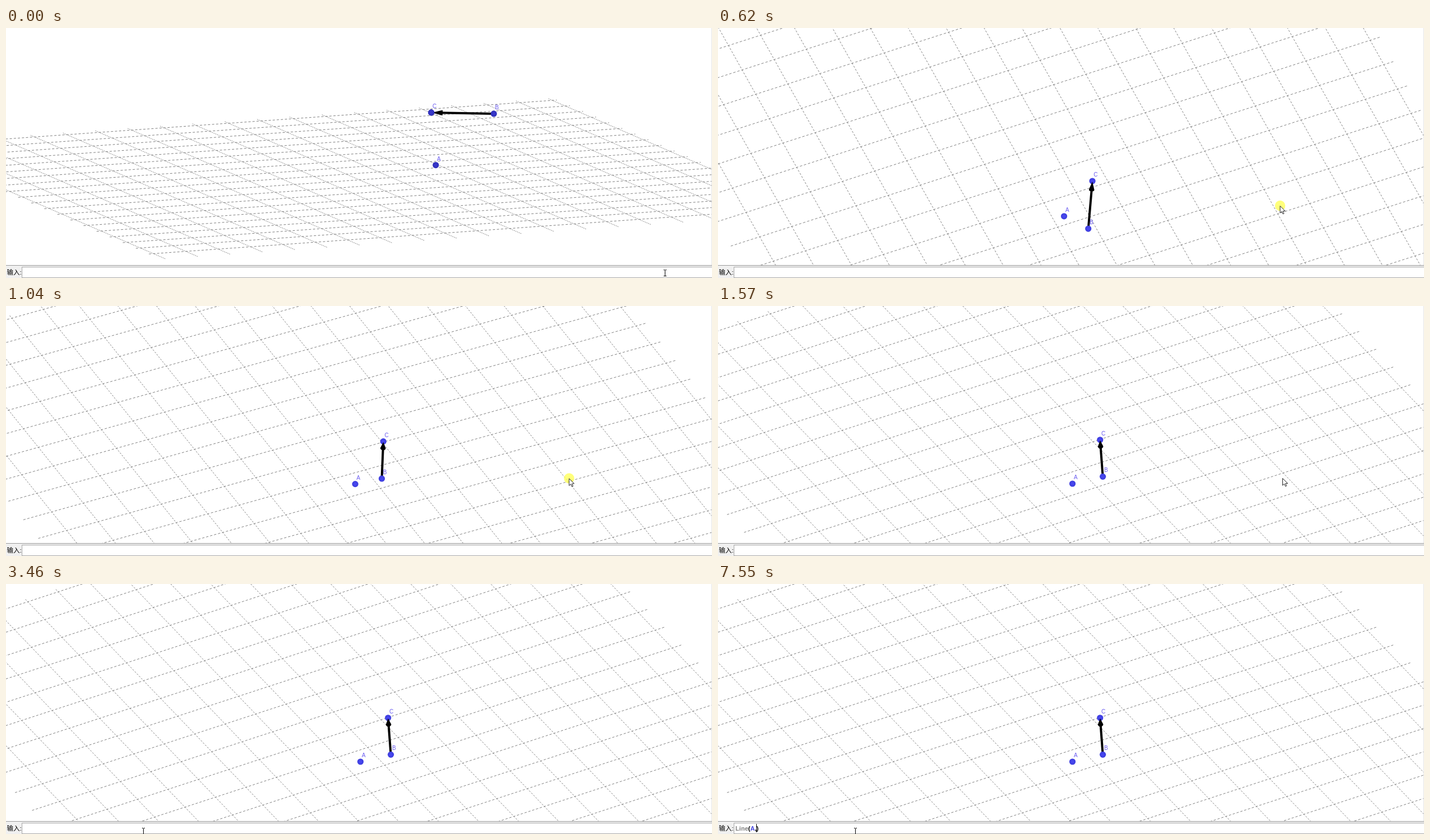
An HTML page with a canvas for the animation above (8000 ms loop, 1256 by 446 pixels).

```html
<!DOCTYPE html>
<html lang="zh">
<head>
<meta charset="utf-8">
<title>3D view with command input</title>
<style>
  html, body { margin: 0; width: 100%; height: 100%; overflow: hidden; background: #fff; }
  #bar {
    position: absolute; left: 0; top: 423px; width: 1256px; height: 23px;
    box-sizing: border-box; background: #f0f0f0; border-top: 1px solid #999; overflow: hidden;
  }
  #label {
    position: absolute; left: 1.5px; top: 3px; color: #000; white-space: nowrap;
    font: 11.5px/18px "Liberation Sans", "Noto Sans CJK SC", "Noto Sans CJK", sans-serif;
  }
  #field {
    position: absolute; left: 28px; top: 2px; width: 1240px; height: 18px;
    border: 1px solid #a6a6a6; background: #fff;
  }
  #cmd {
    position: absolute; left: 2.1px; top: 1px; white-space: pre; color: #808080;
    font: bold 11px/17px "Liberation Sans", Arial, sans-serif;
  }
  #caret { position: absolute; top: 1px; width: 1px; height: 15px; background: #000; }
  canvas { position: absolute; left: 0; top: 0; }
</style>
</head>
<body>
<div id="bar">
  <span id="label">输入:</span>
  <div id="field"><span id="cmd"></span><span id="caret"></span></div>
</div>
<canvas id="stage" width="1256" height="446"></canvas>
<script>
const LOOP = 8000, W = 1256, VIEW_H = 423;
const SCALE = 62.1, CX = 628, CY = 212, FLOOR = -0.92;
const ctx = document.getElementById('stage').getContext('2d');
const cmd = document.getElementById('cmd');
const caret = document.getElementById('caret');

const A = [-1.044, 1.95, -0.49];
const B = [-1.05, 3.74, 0.89];
const C = [-0.241, 2.135, 0.897];

// step, turn and tilt in degrees
const viewKeys = [[2, 112, 10.1], [8, 23, 49.5], [12, 9, 38], [15, 29.25, 35.8]];
// step, pointer x and y
const dragKeys = [[-1, 1172, 437], [2, 1062, 290], [8, 999.5, 317], [12, 990, 309], [15, 1004, 307]];
const leaveKeys = [[0, 1004, 307], [11, 248, 420]];

// start time, text, caret index (-1 hides it)
const typing = [
  [0, '', -1], [2920, '', 0], [3460, '', -1], [3940, 'L', 1], [4210, 'Li', 2],
  [4410, 'Lin', 3], [4610, 'Line', 4], [5080, 'Line(', 5], [5210, 'Line()', 5],
  [5340, 'Line()', 6], [5870, 'Line()', -1], [6140, 'Line()', 5],
  [6540, 'Line(A)', 6], [7000, 'Line(A)', -1], [7550, 'Line(A,)', 7]
];

const easeOut = u => 1 - Math.pow(1 - u, 1.5);
const smooth = u => u * u * (3 - 2 * u);

function sample(keys, n, ease) {
  if (n <= keys[0][0]) return keys[0].slice(1);
  for (let i = 1; i < keys.length; i++) {
    const a = keys[i - 1], b = keys[i];
    if (n <= b[0]) {
      const u = ease((n - a[0]) / (b[0] - a[0]));
      return [1, 2].map(c => a[c] + (b[c] - a[c]) * u);
    }
  }
  return keys[keys.length - 1].slice(1);
}

function camera(turn, tilt) {
  const a = turn * Math.PI / 180, b = tilt * Math.PI / 180;
  const ca = Math.cos(a), sa = Math.sin(a), k = Math.sin(b), c = Math.cos(b);
  const project = ([x, y, z]) => [
    CX + SCALE * (x * ca + y * sa),
    CY + SCALE * (k * (y * ca - x * sa) - z * c)
  ];
  return { project, k };
}

function dashed(cam, from, to) {
  const p = cam.project(from), q = cam.project(to);
  const units = Math.hypot(to[0] - from[0], to[1] - from[1]);
  const period = Math.hypot(q[0] - p[0], q[1] - p[1]) / units / 8;
  ctx.setLineDash([period * 0.56, period * 0.44]);
  ctx.beginPath();
  ctx.moveTo(...p);
  ctx.lineTo(...q);
  ctx.stroke();
}

function drawGrid(cam) {
  ctx.strokeStyle = '#808080';
  ctx.lineWidth = 1;
  for (let n = -10; n <= 10; n++) {
    const x = n + 0.77, y = n - 0.08;
    if (n < 10) dashed(cam, [x, -10.22, FLOOR], [x, 10.06, FLOOR]);
    dashed(cam, [-10.13, y, FLOOR], [10.08, y, FLOOR]);
  }
  ctx.setLineDash([]);
}

function drawDot([x, y], k) {
  const light = Math.min(1, (k - 0.17) / 0.4);
  const mix = (a, b) => Math.round(a + (b - a) * light);
  const g = ctx.createRadialGradient(x, y, 1, x, y, 5.6);
  g.addColorStop(0, `rgb(${mix(56, 72)},${mix(56, 72)},${mix(204, 240)})`);
  g.addColorStop(1, `rgb(${mix(48, 60)},${mix(48, 60)},${mix(184, 220)})`);
  ctx.fillStyle = g;
  ctx.beginPath();
  ctx.arc(x, y, 5.6, 0, 2 * Math.PI);
  ctx.fill();
}

function drawArrow(p, q) {
  const full = SCALE * Math.hypot(C[0] - B[0], C[1] - B[1], C[2] - B[2]);
  const len = Math.hypot(q[0] - p[0], q[1] - p[1]);
  const ratio = Math.min(1, len / full);
  const head = len - 20 * ratio;
  ctx.save();
  ctx.translate(...p);
  ctx.rotate(Math.atan2(q[1] - p[1], q[0] - p[0]));
  ctx.fillStyle = '#000';
  ctx.fillRect(0, -2, head + 2, 4);
  ctx.beginPath();
  ctx.moveTo(len - 1, 0);
  ctx.lineTo(head, 4.8);
  ctx.ellipse(head, 0, 4.8 * Math.sqrt(1 - ratio * ratio), 4.8, 0, Math.PI / 2, Math.PI * 1.5);
  ctx.fill();
  ctx.restore();
  return ratio;
}

function drawScene(cam) {
  ctx.save();
  ctx.beginPath();
  ctx.rect(0, 0, W, VIEW_H);
  ctx.clip();
  drawGrid(cam);
  const [a, b, c] = [A, B, C].map(cam.project);
  drawDot(a, cam.k);
  drawDot(c, cam.k);
  if (drawArrow(b, c) > 0.95) drawDot(c, cam.k);
  drawDot(b, cam.k);
  ctx.fillStyle = '#6a5cf0';
  ctx.font = '10px "Liberation Sans", Arial, sans-serif';
  [['A', a], ['B', b], ['C', c]].forEach(([s, p]) => ctx.fillText(s, p[0] + 2.3, p[1] - 8));
  ctx.fillStyle = '#e6e6e6';
  ctx.fillRect(W - 1, 0, 1, VIEW_H);
  ctx.restore();
}

function drawHalo(x, y) {
  ctx.fillStyle = 'rgba(255,255,90,0.8)';
  ctx.beginPath();
  ctx.arc(x, y, 9.2, 0, 2 * Math.PI);
  ctx.fill();
}

function drawPointer(x, y) {
  const shape = [[0, 0], [0, 12.5], [3, 9.9], [5, 14.3], [7, 13.4], [5, 9.2], [9, 9]];
  ctx.beginPath();
  shape.forEach(([dx, dy]) => ctx.lineTo(x + dx + 0.5, y + dy + 0.5));
  ctx.closePath();
  ctx.fillStyle = '#fff';
  ctx.fill();
  ctx.strokeStyle = '#222';
  ctx.lineWidth = 1;
  ctx.stroke();
}

function drawBeam(x, y) {
  x = Math.round(x);
  y = Math.round(y);
  ctx.fillStyle = '#000';
  ctx.fillRect(x, y - 5, 1, 11);
  for (const dy of [-6, 5]) {
    ctx.fillRect(x - 2, y + dy, 2, 1);
    ctx.fillRect(x + 1, y + dy, 2, 1);
  }
}

function drawCursor(t, n) {
  if (t < 1570) {
    const [x, y] = sample(dragKeys, n, easeOut);
    if (n >= 2) drawHalo(x + 0.5, y);
    (y > 425 ? drawBeam : drawPointer)(x, y);
  } else if (t < 2460) {
    drawPointer(...sample(leaveKeys, Math.floor((t - 1570) / 69), smooth));
  } else if (t < 2590) {
    drawBeam(245, 430);
  } else if (t < 3000) {
    if (t >= 2920) drawHalo(244.5, 434);
    drawBeam(244, 433);
  } else {
    drawBeam(244, 441);
  }
}

const inkOf = (ch, t) =>
  ch === 'A' ? '#4646e0' : '(),'.includes(ch) ? (t < 6540 ? '#0a640a' : '#000') : '#808080';

let shown = null;
function showText(t) {
  const state = typing.filter(s => s[0] <= t).pop();
  if (state === shown) return;
  shown = state;
  const [, text, at] = state;
  cmd.replaceChildren(...[...text].map(ch => {
    const s = document.createElement('span');
    s.textContent = ch;
    s.style.color = inkOf(ch, t);
    return s;
  }));
  caret.style.display = at < 0 ? 'none' : 'block';
  if (at >= 0) {
    const last = cmd.children[at - 1];
    const edge = last ? last.getBoundingClientRect().right - cmd.getBoundingClientRect().left : 0;
    caret.style.left = Math.floor(2.1 + edge) + 'px';
  }
}

const start = performance.now();
function frame() {
  const t = (performance.now() - start) % LOOP;
  const n = Math.max(-1, Math.min(15, Math.floor((t - 70) / 68.7)));
  ctx.clearRect(0, 0, W, 446);
  drawScene(camera(...sample(viewKeys, n, easeOut)));
  drawCursor(t, n);
  showText(t);
  requestAnimationFrame(frame);
}
frame();
</script>
</body>
</html>
```
